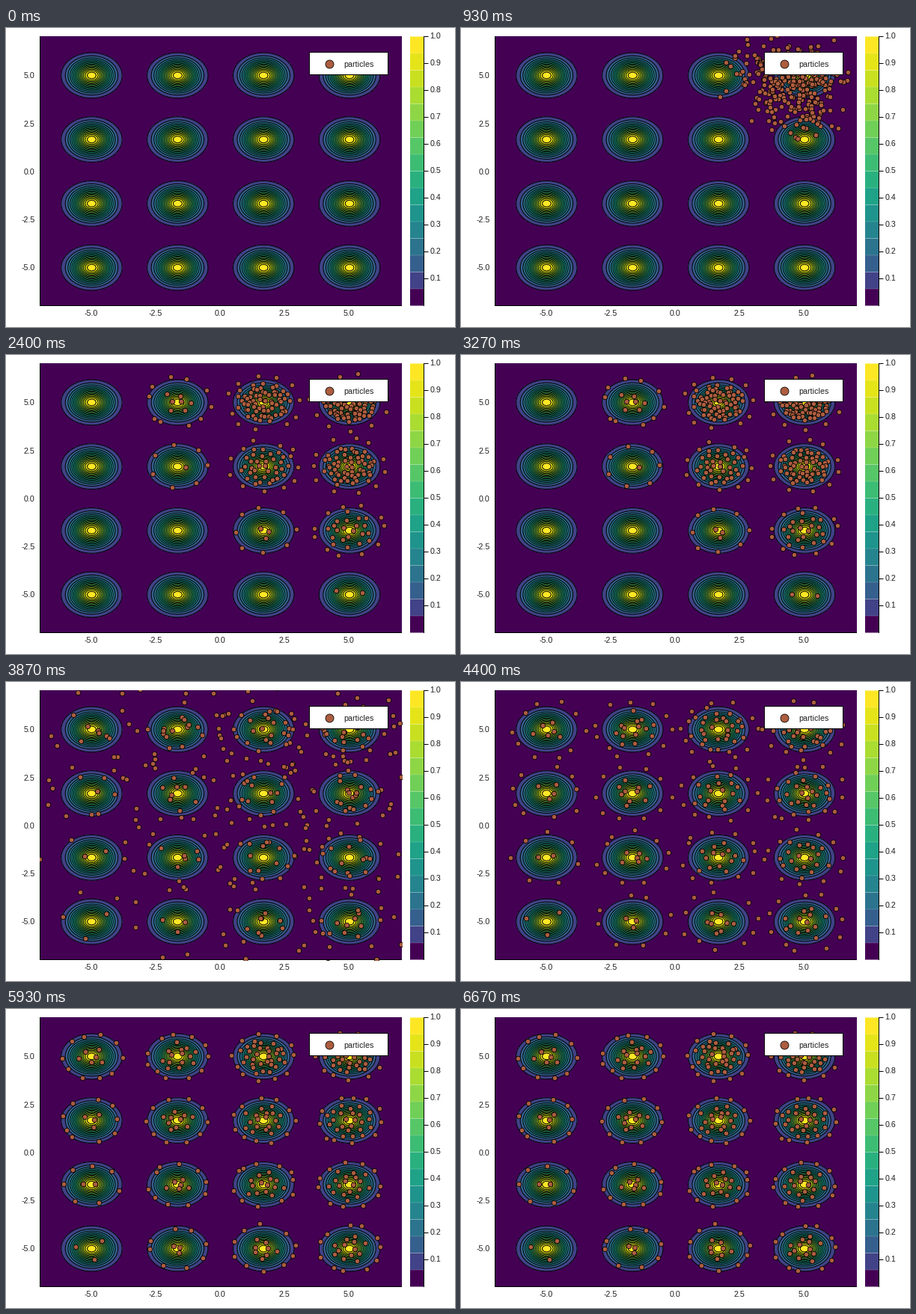
Recreate the animation shown at these times as a matplotlib script. Size 600 by 400 pixels, loop 6.74 s.

```python
import numpy as np
import matplotlib.pyplot as plt
from matplotlib.animation import FuncAnimation
from matplotlib.patches import Rectangle

plt.rcParams["path.snap"] = False

PX = 0.72                       # points per pixel at 100 dpi
LOOP, FRAMES = 6740, 101
LEFT, RIGHT, TOP, BOTTOM = 45.5, 528, 12, 372
FRAME = (45, 11), 484, 361      # corner, width and height of the plot area
BAR_LEFT, BAR_RIGHT, BAR_TOP, BAR_BOTTOM = 540, 558.5, 11.5, 371.5
BANDS = 16
SIGMA = 0.5

# Steps at which the two annealing cycles spread out and settle
SPREAD_1, RESET, SPREAD_2 = 21, 50, 56
START = np.array([5.2, 5.65])

# Particles per mode: columns from left to right, each from top to bottom
COUNTS_1 = [0, 0, 0, 0, 17, 8, 0, 0, 76, 46, 11, 0, 99, 68, 32, 2]
COUNTS_2 = [16, 13, 9, 3, 25, 20, 16, 11, 42, 29, 25, 18, 44, 35, 29, 24]
PHASES = np.radians([-3, 3, 33, 45, 30, 0, 7, 12, 2, 31, 3, 20, 12, 19, 2, 1])

rng = np.random.default_rng(4)
grid = np.linspace(-5, 5, 4)
modes = np.array([(x, y) for x in grid for y in grid[::-1]])


def to_px(x, y):
    return LEFT + (x + 7) * (RIGHT - LEFT) / 14, TOP + (7 - y) * (BOTTOM - TOP) / 14


def polar(r, a):
    return np.column_stack([r * np.cos(a), r * np.sin(a)])


def cluster(n, phase):
    """Offsets of n repelling particles: a loose outer ring and a denser core."""
    ring = round(11.5 * (1 - np.exp(-n / 9)))
    core = n - ring
    radius = 1.12 * (1 - np.exp(-n / 4)) + 0.002 * n
    angle = phase + 2 * np.pi * np.arange(ring) / max(ring, 1)
    outer = polar(radius * (1 + 0.04 * rng.standard_normal(ring)),
                  angle + 0.1 * rng.standard_normal(ring))
    i = np.arange(core)
    reach = min(0.19 * np.sqrt(core), 0.9)
    inner = polar(reach * ((i + 0.5) / max(core, 1)) ** 0.48, phase + 2.4 * i)
    return np.vstack([outer, inner + 0.05 * rng.standard_normal((core, 2))])


def flow_order(points):
    """Order by column, then downwards, so particles move to nearby modes."""
    cuts = np.cumsum(np.reshape(COUNTS_2, (4, 4)).sum(axis=1))[:-1]
    columns = np.split(np.argsort(points[:, 0]), cuts)
    return np.concatenate([c[np.argsort(-points[c, 1])] for c in columns])


def settled_state(counts):
    centers = np.repeat(modes, counts, axis=0)
    offsets = np.vstack([cluster(n, a) for n, a in zip(counts, PHASES)])
    order = flow_order(centers + offsets)
    return centers[order], offsets[order]


centers_1, offsets_1 = settled_state(COUNTS_1)
centers_2, offsets_2 = settled_state(COUNTS_2)
noise = np.clip(rng.standard_normal((len(centers_1), 2)), -2.2, 2.2)
distance = np.hypot(*(centers_1 - grid[2:].mean()).T)
lag = 0.01 * np.maximum(distance - 2.36, 0)[:, None] ** 2


def first_cycle(step):
    heat = np.exp(-(step - SPREAD_1) / 8)
    base = centers_1 + lag * heat ** 2 * (START - centers_1)
    return base + offsets_1 * (1.05 + 0.3 * heat) + 0.33 * heat ** 2 * noise


def second_cycle(step):
    heat = np.exp(-(step - SPREAD_2) / 9)
    return centers_2 + offsets_2 * (1 + 0.52 * heat) + 0.36 * heat ** 2 * noise


def positions(step):
    if step < SPREAD_1:
        u = step / SPREAD_1
        spread = (first_cycle(SPREAD_1) - START) * u ** 1.5
        return START + spread + (0.06 * (1 - u) + 0.45 * np.sin(np.pi * u)) * noise
    if step <= RESET:
        return first_cycle(step)
    if step < SPREAD_2:
        u = ((step - RESET) / (SPREAD_2 - RESET)) ** 0.8
        return (1 - u) * first_cycle(RESET) + u * second_cycle(SPREAD_2)
    return second_cycle(step)


fig = plt.figure(figsize=(6, 4), dpi=100, facecolor="white")
ax = fig.add_axes([0, 0, 1, 1])
ax.set(xlim=(0, 600), ylim=(400, 0))
ax.axis("off")


def label(x, y, text, ha="center"):
    ax.text(x, y, text, ha=ha, va="center", family="Liberation Sans",
            size=10.67 * PX, color="#202020", zorder=7)


def line(xs, ys, **style):
    ax.plot(xs, ys, **{"color": "black", "lw": PX, "zorder": 4, **style})


# Density of the Gaussian mixture
axis = np.linspace(-7, 7, 141)
gx, gy = np.meshgrid(axis, axis)
density = sum(np.exp(-((gx - x) ** 2 + (gy - y) ** 2) / (2 * SIGMA ** 2))
              for x, y in modes)
levels = np.linspace(0, 1, BANDS + 1)
colors = plt.get_cmap("viridis")((np.arange(BANDS) / (BANDS - 1)) ** 0.6)
px, py = to_px(gx, gy)
ax.add_patch(Rectangle(*FRAME, color=colors[0], lw=0))
ax.contourf(px, py, density, levels=np.append(levels[1:-1], 1.01),
            colors=colors[1:], zorder=2)
ax.contour(px, py, density, levels=levels[1:-1], colors="black",
           linewidths=PX, zorder=3)
line([45.5, 45.5, 528.5], [11.5, 371.5, 371.5])

for v in (-5.0, -2.5, 0.0, 2.5, 5.0):
    x, y = to_px(v, v)
    label(x - 1.2, 382.3, f"{v:.1f}")
    label(38.5, y + 0.8, f"{v:.1f}", ha="right")

# Colour bar
height = (BAR_BOTTOM - BAR_TOP) / BANDS
for i, color in enumerate(colors):
    y = BAR_BOTTOM - (i + 1) * height
    ax.add_patch(Rectangle((BAR_LEFT, y), BAR_RIGHT - BAR_LEFT, height, fc=color, lw=0))
    if i < BANDS - 1:
        line([BAR_LEFT, BAR_RIGHT], [y, y], color="white", alpha=0.25, lw=0.5)
line([BAR_RIGHT, BAR_RIGHT], [BAR_TOP, BAR_BOTTOM])
for v in np.arange(1, 11) / 10:
    y = BAR_BOTTOM - v * (BAR_BOTTOM - BAR_TOP)
    line([BAR_RIGHT, BAR_RIGHT + 5.5], [y, y])
    label(566.5, y, f"{v:.1f}", ha="left")

# Particles and legend
dot = dict(facecolor="#ad5d3f", edgecolor="black", linewidths=0.8 * PX)
particles = ax.scatter([], [], s=(6.4 * PX) ** 2, zorder=5, **dot)
particles.set_clip_path(Rectangle(*FRAME, transform=ax.transData))
ax.add_patch(Rectangle((405.5, 32.5), 105, 30, fc="white", ec="black", lw=PX, zorder=6))
ax.scatter([432], [48], s=(11 * PX) ** 2, zorder=7, **dot)
label(451.4, 48.5, "particles", ha="left")


def update(frame):
    step = max(frame - 2, 0)
    particles.set_offsets(np.column_stack(to_px(*positions(step).T)))
    return particles,


anim = FuncAnimation(fig, update, frames=FRAMES, interval=LOOP / FRAMES,
                     repeat=True, repeat_delay=0, blit=False)
plt.show()
```
